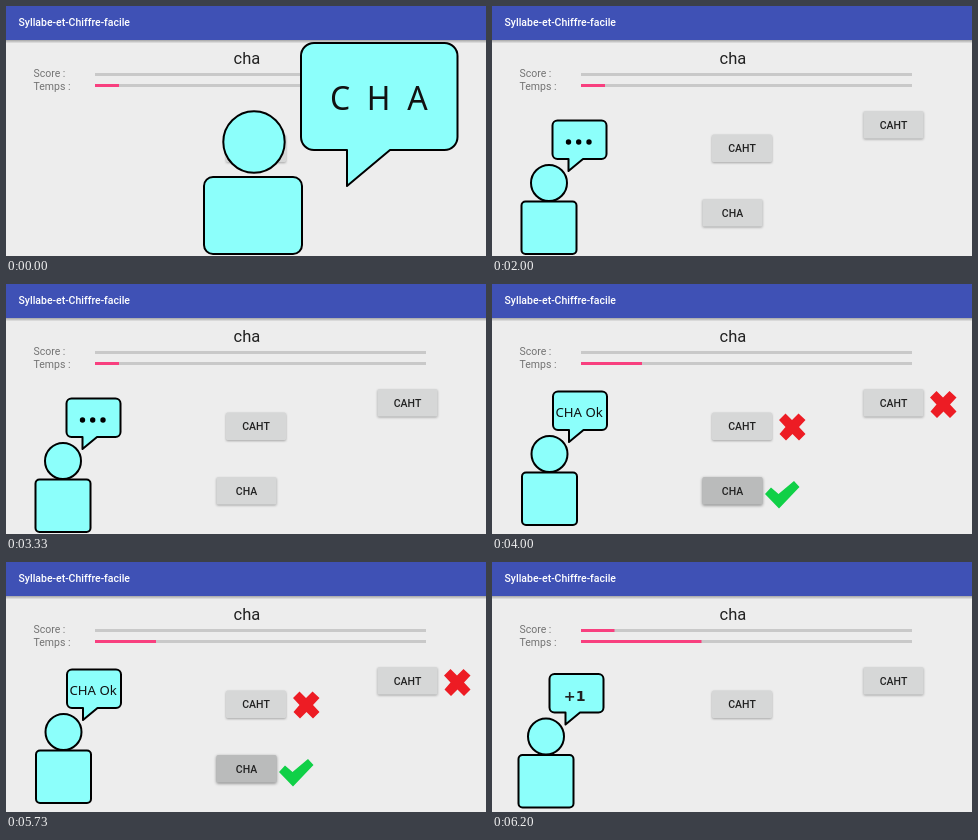
An HTML page for the animation above (7.99 s loop, 480x250 px).

```html
<!DOCTYPE html>
<html lang="fr">
<head>
<meta charset="utf-8">
<title>Syllabe-et-Chiffre-facile</title>
<style>
  html, body { margin: 0; width: 100%; height: 100%; overflow: hidden; background: #ededed; }
  svg { display: block; width: 480px; height: 250px; }
  text { font-family: Roboto, sans-serif; font-size: 10.5px; fill: #212121; }
  .label { fill: #737373; }
  .title { font-weight: 500; fill: #fff; }
  .word { font-size: 16.5px; }
  .button text { font-weight: 500; text-anchor: middle; }
  .button rect { fill: #d6d7d7; filter: drop-shadow(0 1px 0.8px rgba(0, 0, 0, .3)); }
  .button.pressed rect { fill: #babbbb; filter: drop-shadow(0 1.5px 1.5px rgba(0, 0, 0, .45)); }
  .track { fill: #c9c9c9; }
  .progress { fill: #f8407f; }
  .figure { fill: #8cfffb; stroke: #000; stroke-width: 2; stroke-linejoin: round; }
  .speech { font-family: "Noto Sans", sans-serif; fill: #111; }
  .cross { fill: #ed1c24; }
  .check { fill: #10d047; }
</style>
</head>
<body>
<svg viewBox="0 0 480 250">
  <defs>
    <linearGradient id="shade" x2="0" y2="1">
      <stop stop-color="#000" stop-opacity=".3"/>
      <stop offset="1" stop-color="#000" stop-opacity="0"/>
    </linearGradient>
    <g id="person" class="figure">
      <rect x="29.5" y="195.5" width="55" height="52.5" rx="4"/>
      <circle cx="57" cy="177" r="18"/>
      <path d="M65.500 114.500H109.500a5 5 0 0 1 5 5V148a5 5 0 0 1-5 5H91L76.500 165V153H65.500a5 5 0 0 1-5-5V119.500a5 5 0 0 1 5-5z"/>
    </g>
    <path id="cross" class="cross" d="M287 136l6.500-6.500L300 136l6.500-6.500 7 6.500-6.500 7 6.500 7-6.500 6.500-6.500-6.500-6.500 6.500-6.500-6.500 6-7z"/>
  </defs>

  <rect width="480" height="250" fill="#ededed"/>
  <rect y="34" width="480" height="3.500" fill="url(#shade)"/>
  <rect width="480" height="34" fill="#3f51b5"/>
  <text class="title" x="12.500" y="20">Syllabe-et-Chiffre-facile</text>

  <text class="word" x="227.500" y="58">cha</text>
  <text class="label" x="27.500" y="71">Score :</text>
  <text class="label" x="27.500" y="84">Temps :</text>
  <rect class="track" x="89" y="67" width="331" height="3"/>
  <rect class="track" x="89" y="78" width="331" height="3"/>
  <rect class="progress" id="score" x="89" y="67" height="3"/>
  <rect class="progress" id="time" x="89" y="78" height="3"/>

  <g class="button" transform="translate(220 128.500)">
    <rect width="60" height="27.500" rx="1.500"/><text x="30" y="17.700">CAHT</text>
  </g>
  <g class="button" transform="translate(371.500 105)">
    <rect width="60" height="27.500" rx="1.500"/><text x="30" y="17.700">CAHT</text>
  </g>
  <g class="button" id="answer" transform="translate(210.500 193)" data-scenes="012">
    <rect width="60" height="27.500" rx="1.500"/><text x="30" y="17.700">CHA</text>
  </g>

  <g data-scenes="0">
    <g class="figure">
      <rect x="198" y="171" width="98" height="77" rx="9"/>
      <circle cx="248" cy="136" r="30.700"/>
      <path d="M308 37H438.500a13 13 0 0 1 13 13V131a13 13 0 0 1-13 13H384L341 180V144H308a13 13 0 0 1-13-13V50a13 13 0 0 1 13-13z"/>
    </g>
    <text class="speech" x="324" y="104" style="font-size:32px">C&nbsp;&nbsp;H&nbsp;&nbsp;A</text>
  </g>

  <g data-scenes="1">
    <use href="#person"/>
    <circle cx="76.500" cy="136" r="2.700"/>
    <circle cx="86.700" cy="136" r="2.700"/>
    <circle cx="97" cy="136" r="2.700"/>
  </g>

  <g data-scenes="2">
    <use href="#person" x="0.500" y="-7"/>
    <text class="speech" x="63.500" y="133" style="font-size:13.200px">CHA Ok</text>
    <use href="#cross"/>
    <use href="#cross" x="151" y="-22.500"/>
    <path class="check" d="M273 210l6-6.500 7.500 6.500L302 197l5.500 6L287 224.500z"/>
  </g>

  <g data-scenes="3">
    <use href="#person" x="-3" y="-2.500"/>
    <text x="71.800" y="139" style="font:bold 14.200px 'DejaVu Sans',sans-serif">+1</text>
  </g>
</svg>
<script>
  const LOOP = 7990;
  const scenes = [
    { start: 0, score: 0, time: 24 },
    { start: 2000, score: 0, time: 24 },
    { start: 4000, score: 0, time: 61 },
    { start: 6000, score: 33.5, time: 120.5 },
  ];
  const byId = id => document.getElementById(id);
  const parts = document.querySelectorAll('[data-scenes]');
  let shown = -1;

  function show(index) {
    if (index === shown) return;
    shown = index;
    for (const part of parts) {
      part.style.display = part.dataset.scenes.includes(index) ? '' : 'none';
    }
    byId('score').setAttribute('width', scenes[index].score);
    byId('time').setAttribute('width', scenes[index].time);
    byId('answer').classList.toggle('pressed', index === 2);
  }

  const origin = performance.now();
  function tick() {
    const t = (performance.now() - origin) % LOOP;
    show(scenes.findLastIndex(scene => scene.start <= t));
    requestAnimationFrame(tick);
  }
  tick();
</script>
</body>
</html>
```
